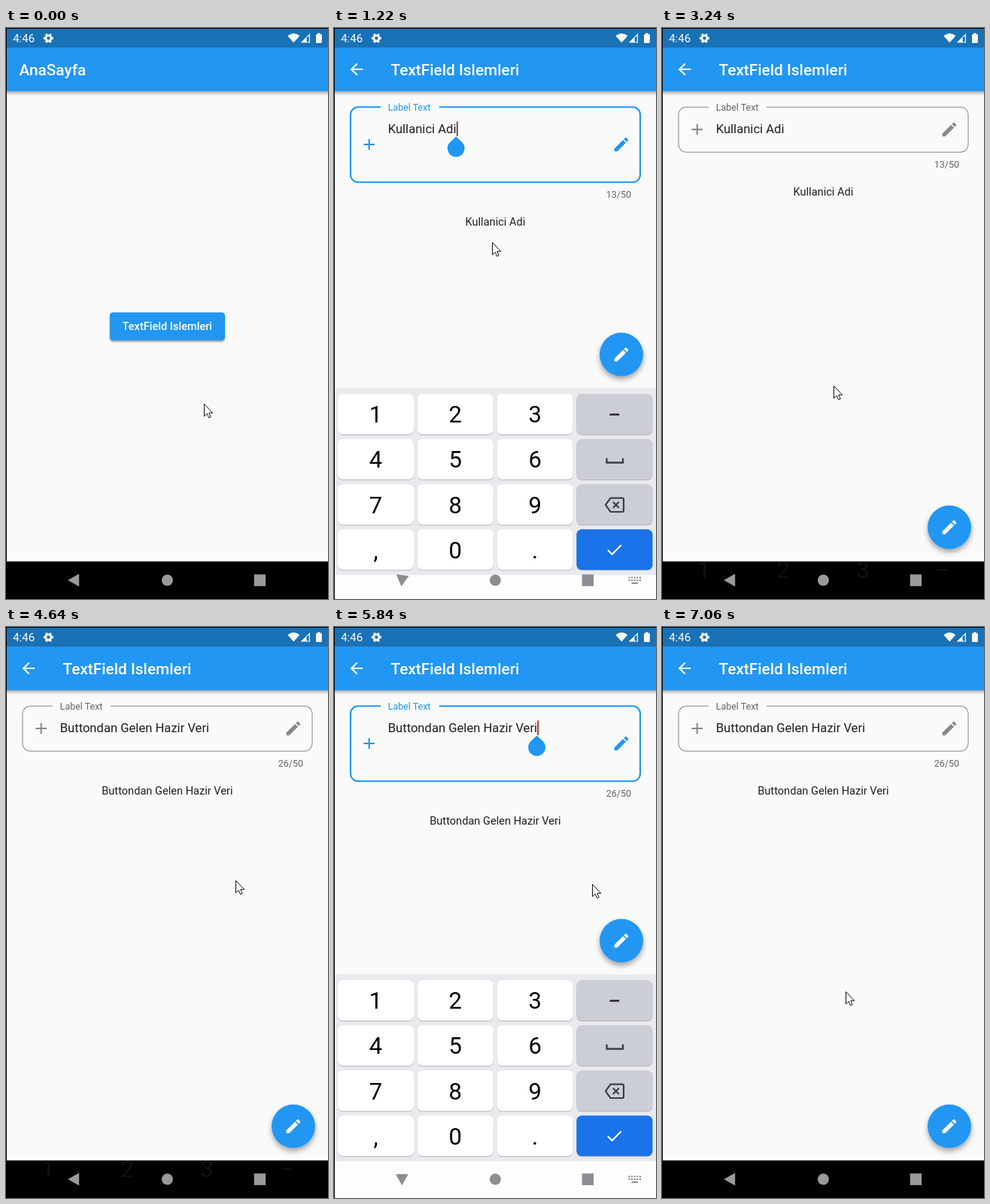
An HTML page for the animation above (7.46 s loop, 428x760 px).

```html
<!DOCTYPE html>
<html lang="tr">
<head>
<meta charset="utf-8">
<title>TextField Islemleri</title>
<style>
html, body { margin: 0; width: 100%; height: 100%; overflow: hidden; background: #fafafa; }
svg { display: block; width: 100vw; height: 100vh; font-family: Roboto, sans-serif; }
.title { font-size: 20.8px; font-weight: 500; fill: #fff; }
</style>
</head>
<body>
<svg id="stage" viewBox="0 0 428 760" xmlns="http://www.w3.org/2000/svg">
  <defs>
    <filter id="barShade" x="-5%" y="-20%" width="110%" height="150%"><feDropShadow dx="0" dy="2.5" stdDeviation="2" flood-opacity=".38"/></filter>
    <filter id="btnShade" x="-10%" y="-20%" width="120%" height="160%"><feDropShadow dx="0" dy="1.8" stdDeviation="1.3" flood-opacity=".4"/></filter>
    <filter id="fabShade" x="-30%" y="-30%" width="160%" height="170%"><feDropShadow dx="0" dy="4" stdDeviation="3.6" flood-opacity=".36"/></filter>
    <path id="pencil" transform="scale(1.039) translate(-12 -12)" d="M3 17.25V21h3.75L17.81 9.94l-3.75-3.75L3 17.25zM20.71 7.04c.39-.39.39-1.02 0-1.41l-2.34-2.34c-.39-.39-1.02-.39-1.41 0l-1.83 1.83 3.75 3.75 1.83-1.83z"/>
  </defs>

  <g id="home">
    <rect width="428" height="760" fill="#fafafa"/>
    <rect x="-10" y="10" width="448" height="74" fill="#2196f3" filter="url(#barShade)"/>
    <text class="title" x="17.6" y="63">AnaSayfa</text>
    <rect id="button" x="138" y="378.5" width="153" height="37.3" rx="4.2" fill="#2196f3" filter="url(#btnShade)"/>
    <text x="154.6" y="402.2" font-size="14.55" font-weight="500" fill="#fff">TextField Islemleri</text>
  </g>

  <g id="form">
    <rect width="428" height="960" fill="#fafafa"/>
    <rect x="-10" y="10" width="448" height="74" fill="#2196f3" filter="url(#barShade)"/>
    <path transform="translate(30 55) scale(1.039) translate(-12 -12)" fill="#fff" d="M20 11H7.83l5.59-5.59L12 4l-8 8 8 8 1.41-1.41L7.83 13H20z"/>
    <text class="title" x="75.5" y="63">TextField Islemleri</text>
    <path id="border" fill="none"/>
    <text id="label" x="71.7" y="109.6" font-size="12.47">Label Text</text>
    <g id="icons">
      <path transform="translate(46.7 0) scale(1.039) translate(-12 -12)" d="M19 13h-6v6h-2v-6H5v-2h6V5h2v6h6z"/>
      <use href="#pencil" x="382"/>
    </g>
    <text id="value" x="71.7" y="140" font-size="16.62" fill="#1f1f1f"></text>
    <g id="caret">
      <rect id="bar" x="0.6" y="124.5" width="2" height="19.5"/>
      <path transform="translate(0 160)" fill="#2196f3" d="M0 -15.6L8 -8A11.4 11.4 0 1 1 -8 -8Z"/>
    </g>
    <text id="count" x="395" font-size="12.5" text-anchor="end" fill="#666"></text>
    <text id="echo" x="214.4" font-size="14.6" text-anchor="middle" fill="#1f1f1f"></text>
    <g id="fab">
      <circle cx="382" cy="664.5" r="29" fill="#2196f3" filter="url(#fabShade)"/>
      <circle id="ripple" cx="382" cy="664.5" r="29" fill="#fff" opacity=".2"/>
      <use href="#pencil" x="382" y="664.5" fill="#fff"/>
    </g>
  </g>

  <g id="board">
    <rect y="462.5" width="428" height="248.5" fill="#e8eaed"/>
    <rect y="711" width="428" height="300" fill="#fdfdfd"/>
    <g id="keys"></g>
    <rect x="366.5" y="496.3" width="12.6" height="2.4" fill="#202124"/>
    <path d="M362.5 555.5V561.5H384V555.5" fill="none" stroke="#3c4043" stroke-width="2.4"/>
    <path d="M367.5 608.7H383a2 2 0 0 1 2 2V625a2 2 0 0 1 -2 2H367.5L361 617.8ZM370.8 613.8l8 8m0 -8l-8 8" fill="none" stroke="#3c4043" stroke-width="2.2"/>
    <path d="M364 677.8l5.6 5.6L381.7 671.3" fill="none" stroke="#fff" stroke-width="2.1"/>
  </g>

  <g id="dark">
    <rect y="705.5" width="428" height="5" fill="#fff"/>
    <rect y="710" width="428" height="50"/>
    <g id="ghost" fill="#111" font-size="31" text-anchor="middle">
      <text x="55.5" y="732">1</text><text x="161" y="732">2</text><text x="267" y="732">3</text>
      <rect x="366" y="720" width="13" height="2.4"/>
    </g>
  </g>
  <g id="nav">
    <path id="back" d="M82.2 735L97.2 726.6V743.4Z"/>
    <circle cx="214.4" cy="735" r="7.5"/>
    <rect x="329.7" y="727.3" width="15.4" height="15.6"/>
    <path id="kbd" d="M391.5 731.5H408M391.5 735H408" fill="none" stroke="#80868b" stroke-width="2" stroke-dasharray="2 1.6"/>
    <rect id="kbdBar" x="395.5" y="738" width="8.5" height="1.8" fill="#80868b"/>
  </g>

  <rect width="428" height="26" fill="#1971b6"/>
  <g fill="#fff">
    <text x="9.2" y="19" font-size="15">4:46</text>
    <g fill="none" stroke="#fff" transform="translate(56.4 13.6)">
      <circle r="3.7" stroke-width="2.9"/>
      <circle r="5.5" stroke-width="2.2" pathLength="12" stroke-dasharray="1 1" stroke-dashoffset=".5"/>
    </g>
    <path d="M374.3 10.6Q382.3 3.8 390.3 10.6L382.3 19.6Z"/>
    <path d="M404 7.2V19.5H391.7Z"/>
    <path d="M399.6 13.2L402.8 10V18.4H399.6Z" fill="#1971b6"/>
    <rect x="412" y="8.2" width="7.8" height="11.8" rx="1"/>
    <rect x="414.2" y="6.8" width="3.4" height="2"/>
  </g>
  <rect width="1" height="760"/>
  <rect width="428" height="1"/>

  <g id="mouse">
    <circle id="click" r="12" fill="#ffee20" opacity=".5"/>
    <path d="M.5 .5V16.8L4.2 13.3L6.7 18.8L9.2 17.7L6.8 12.3H11.7Z" fill="#fff" stroke="#111" stroke-width="1"/>
  </g>
</svg>
<script>
const LOOP = 7460, LIFT = 247;
const BLUE = '#2196f3', GREY = '#8a8a8a';
const el = {};
document.querySelectorAll('[id]').forEach(n => { el[n.id] = n; });
const set = (id, attrs) => { for (const k in attrs) el[id].setAttribute(k, attrs[k]); };
const show = (id, on) => { el[id].style.display = on ? '' : 'none'; };

// [time, x, y]
const mousePath = [
  [0, 263, 500], [400, 214, 402], [600, 214, 330], [800, 212, 200], [1020, 208, 145],
  [1220, 210, 285], [1420, 228, 350], [2020, 365, 655], [2220, 375, 678], [2420, 364, 660],
  [2820, 285, 545], [3240, 228, 476], [3640, 262, 540], [3840, 262, 540], [4240, 378, 660],
  [4440, 352, 530], [4640, 305, 337], [5040, 232, 140], [5440, 245, 160], [5840, 343, 342],
  [6260, 375, 678], [6460, 352, 645], [7060, 244, 485]
];
// [time, lifted height]
const boardPath = [
  [0, 0], [1020, 0], [1220, 230], [1420, LIFT], [2420, LIFT], [2620, 22], [2820, 0],
  [5440, 0], [5640, 230], [5840, LIFT], [6460, LIFT], [6660, 22], [6860, 0]
];
const clicks = [400, 1020, 2220, 4240, 5240, 6260];

function track(points, t) {
  const i = points.findIndex(p => p[0] > t);
  if (i < 0) return points[points.length - 1].slice(1);
  const a = points[i - 1], b = points[i];
  const f = (t - a[0]) / (b[0] - a[0]);
  return a.slice(1).map((v, j) => v + (b[j + 1] - v) * f);
}

const start = i => 200 * i + 20 * ((i >= 5) + (i >= 16) + (i >= 31));
function snap(t) {
  let i = 35;
  while (start(i) > t) i--;
  return start(i);
}

function buildKeys() {
  let out = '';
  ['123', '456', '789', ',0.'].forEach((row, r) => {
    for (let c = 0; c < 4; c++) {
      const x = 5 + c * 105.8, y = 470 + r * 60.1;
      const enter = c === 3 && r === 3;
      const fill = enter ? '#1a73e8' : c === 3 ? '#cbced5' : '#fff';
      out += `<rect x="${x}" y="${y + 1}" width="101" height="54" rx="7" fill="#b4b6ba"/>`
        + `<rect ${enter ? 'id="enter"' : ''} x="${x}" y="${y}" width="101" height="54" rx="7" fill="${fill}"/>`;
      if (c < 3) out += `<text x="${x + 50.5}" y="${y + 38.3}" font-size="31" text-anchor="middle">${row[c]}</text>`;
    }
  });
  el.keys.innerHTML = out;
  el.enter = document.getElementById('enter');
}

function outline(bottom, gapEnd) {
  const r = 10;
  return `M${gapEnd} 105.3H${407 - r}a${r} ${r} 0 0 1 ${r} ${r}V${bottom - r}a${r} ${r} 0 0 1 -${r} ${r}`
    + `H${22 + r}a${r} ${r} 0 0 1 -${r} -${r}V${105.3 + r}a${r} ${r} 0 0 1 ${r} -${r}H62`;
}

function drawField(t) {
  const first = t >= 1020 && t < 2420;
  const focus = first || (t >= 5440 && t < 6460);
  const filled = t >= 4440;
  const text = filled ? 'Buttondan Gelen Hazir Veri' : 'Kullanici Adi';
  const grow = focus ? 40 : 0;
  set('border', {
    d: outline(165.3 + grow, focus ? 140 : 139),
    stroke: focus ? BLUE : GREY,
    'stroke-width': focus ? 2.1 : 1.05
  });
  set('label', { fill: focus ? BLUE : '#666' });
  set('icons', { fill: focus ? BLUE : GREY, transform: `translate(0 ${135 + grow / 2})` });
  el.value.textContent = el.echo.textContent = text;
  el.count.textContent = (filled ? 26 : 13) + '/50';
  set('count', { y: 185.7 + grow });
  set('echo', { y: 223 + grow });

  show('caret', focus);
  set('caret', { transform: `translate(${filled ? 269.6 : 162.2} 0)` });
  const since = t - (first ? 1020 : 5440);
  show('bar', since % 1000 < 500);
  set('bar', { fill: filled ? '#b83430' : t < 1400 ? '#7d5048' : '#e53935' });
}

function draw(time) {
  const t = snap(time);
  const clicked = clicks.includes(t);

  const p = Math.min(1, Math.max(0, (t - 460) / 300));
  const ease = 1 - (1 - p) ** 3;
  show('form', p > 0);
  set('form', { opacity: ease, transform: `translate(0 ${(1 - ease) * 178})` });
  set('button', { fill: t === 400 ? '#4dabf5' : BLUE });

  drawField(t);

  const [lift] = track(boardPath, t);
  const up = lift > 30;
  show('board', lift > 0);
  set('board', { transform: `translate(0 ${LIFT - lift})` });
  set('fab', { transform: `translate(0 ${-lift})` });
  set('enter', { fill: clicked && up ? '#185abc' : '#1a73e8' });
  show('ripple', t === 4240);

  show('dark', !up);
  show('ghost', t >= 2620 && t < 5440);
  set('nav', { fill: up ? '#8c8e91' : '#9a9a9a' });
  set('back', { transform: `rotate(${-90 * lift / LIFT} 90.4 735)` });
  show('kbd', up);
  show('kbdBar', up);

  const [x, y] = track(mousePath, t);
  set('mouse', { transform: `translate(${x} ${y})` });
  show('click', clicked);
}

buildKeys();
const t0 = performance.now();
function tick() {
  draw((performance.now() - t0) % LOOP);
  requestAnimationFrame(tick);
}
tick();
</script>
</body>
</html>
```
